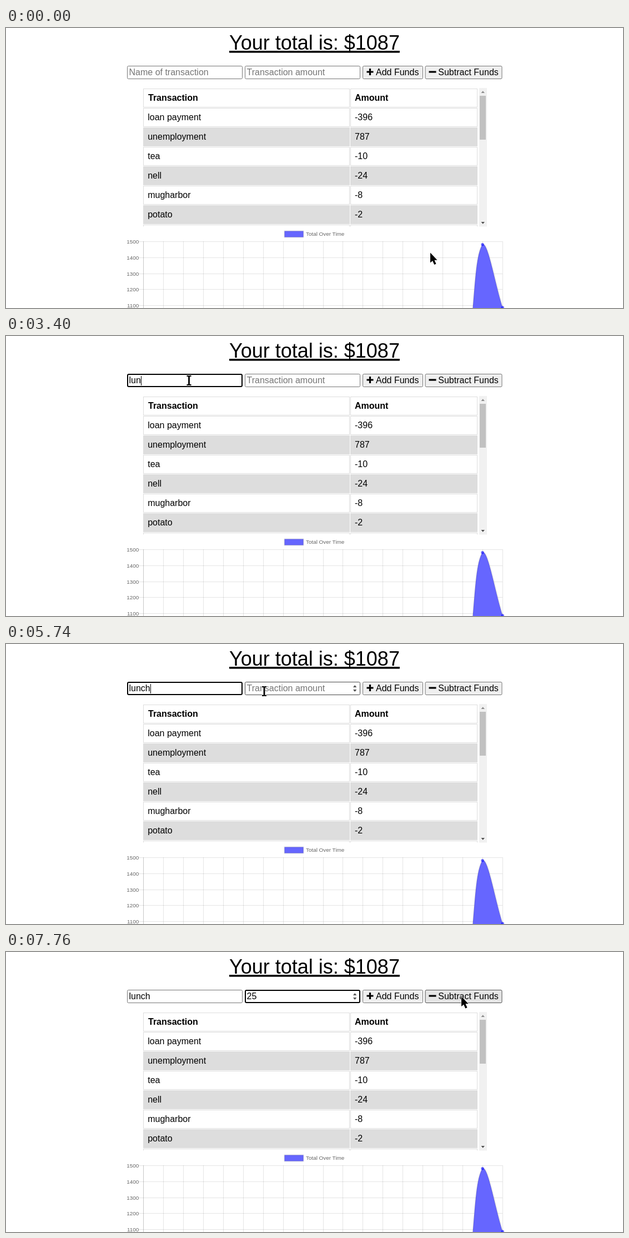
An HTML page that plays this animation: 1111 by 504 pixels, repeating every 8000 ms.

```html
<!DOCTYPE html>
<html lang="en">
<head>
<meta charset="utf-8">
<title>Budget tracker</title>
<style>
  html, body { margin: 0; width: 100%; height: 100%; overflow: hidden; background: #fff; }
  svg { display: block; width: 1111px; height: 504px; font: 16px "Liberation Sans", Arial, sans-serif; }
  text { white-space: pre; }
  .title { font-size: 36px; text-decoration: underline; }
  .head { font-weight: bold; }
  .small { font-size: 9.9px; fill: #666; }
  .cell { fill: #fff; stroke: #ddd; }
  .cell.odd { fill: #ddd; }
  .field { fill: #fff; stroke: #767676; }
  .field.hover { stroke: #484848; }
  .field.focus { stroke: #000; stroke-width: 2; }
  .hint { fill: #757575; }
  .button { fill: #efefef; stroke: #767676; }
  .button.hover { fill: #e5e5e5; stroke: #4f4f4f; }
  .grid { stroke: #000; stroke-opacity: .1; }
  .area { fill: #66f; }
  .dot { fill: rgba(0, 0, 255, .6); }
  .line { fill: none; stroke: rgba(0, 0, 0, .1); stroke-width: 2; }
  .arrows { fill: #505050; }
</style>
</head>
<body>
<svg viewBox="0 0 1111 504">
  <defs>
    <clipPath id="tableClip"><rect x="240" y="100" width="612" height="257.5"/></clipPath>
  </defs>

  <text class="title" x="402" y="39">Your total is: $1087</text>

  <rect class="field" id="nameBox" rx="2"/>
  <text id="nameText" x="221.5" y="85"></text>
  <rect class="field" id="amountBox" rx="2"/>
  <text id="amountText" x="433.5" y="85"></text>
  <path class="arrows" id="spinner" d="M625 78l3.2-4 3.2 4zM625 82h6.4l-3.2 4z"/>
  <rect id="caret" y="72" width="1" height="17"/>

  <rect class="button" id="addBox" x="642.5" y="68.5" width="108" height="23" rx="2"/>
  <path d="M649.5 79h12M655.5 73v12" stroke="#000" stroke-width="3.2"/>
  <text x="666" y="85">Add Funds</text>
  <rect class="button" id="subtractBox" x="755" y="68.5" width="138" height="23" rx="2"/>
  <path d="M761.5 79h13" stroke="#000" stroke-width="3.2"/>
  <text x="778.3" y="85">Subtract Funds</text>

  <g id="table" clip-path="url(#tableClip)"></g>
  <rect x="852" y="108" width="14" height="249.5" fill="#f1f1f1"/>
  <rect x="853" y="122" width="11" height="79" fill="#c1c1c1"/>
  <path d="M855.5 117l3.2-3.8 3.2 3.8z" fill="#8b8b8b"/>
  <path class="arrows" d="M855.5 349h6.4l-3.2 3.8z"/>

  <rect class="area" x="501.5" y="365.5" width="34" height="11"/>
  <rect class="line" x="501.5" y="365.5" width="34" height="11"/>
  <text class="small" x="540" y="374">Total Over Time</text>
  <g id="grid"></g>
  <path class="area" d="M822 615C847 538 839 419 858 389.5C868 384.5 880 457.6 894.3 503V615z"/>
  <path class="line" d="M822 615C847 538 839 419 858 389.5C868 384.5 880 457.6 894.3 503"/>
  <circle class="dot" cx="858" cy="389.7" r="2.6"/>
  <circle class="dot" cx="894.3" cy="503" r="2.6"/>

  <g id="pointer">
    <path id="arrow" stroke="#fff" stroke-width="1.2" paint-order="stroke"
      d="M0 0V18L4.1 14.4L7.2 21.6L10.5 20.1L7.4 13.2H12.5z"/>
    <path id="beam" stroke="#fff" stroke-width="1.2" paint-order="stroke"
      d="M-4-9H-1L0-8.4L1-9H4V-7H1.4V7H4V9H1L0 8.4L-1 9H-4V7H-1.4V-7H-4z"/>
  </g>
</svg>
<script>
  const LOOP = 8000, BLINK = 540;
  const $ = id => document.getElementById(id);

  function add(parent, tag, attrs, text = '') {
    const node = document.createElementNS('http://www.w3.org/2000/svg', tag);
    for (const key in attrs) node.setAttribute(key, attrs[key]);
    node.textContent = text;
    $(parent).append(node);
  }

  const rows = [
    ['Transaction', 'Amount'], ['loan payment', '-396'], ['unemployment', '787'], ['tea', '-10'],
    ['nell', '-24'], ['mugharbor', '-8'], ['potato', '-2'], ['', '']
  ];
  rows.forEach(([label, amount], i) => {
    const y = 109.5 + 35 * i;
    const cell = (x, width, text, textX) => {
      add('table', 'rect', { class: i && i % 2 === 0 ? 'cell odd' : 'cell', x, y, width, height: 33 });
      add('table', 'text', { class: i ? '' : 'head', x: textX, y: y + 21.5 }, text);
    };
    cell(247.5, 371, label, i ? 255.2 : 256);
    cell(620.5, 228, amount, 628);
  });

  for (let i = 0; i < 5; i++) {
    const y = Math.floor(384.5 + 28.75 * i) + .5;
    add('grid', 'path', { class: 'grid', d: `M239 ${y}H894` });
    add('grid', 'text', { class: 'small', x: 239.3, y: y + 3.3, 'text-anchor': 'end' }, 1500 - 100 * i);
  }
  for (let i = 0; i < 19; i++) {
    const x = Math.floor(247.9 + 35.9 * i) + .5;
    add('grid', 'path', { class: 'grid', d: `M${x} 384V504`, style: i ? '' : 'stroke-opacity:.22' });
  }

  const smooth = u => u * u * (3 - 2 * u);
  const easeOut = u => 1 - (1 - u) ** 2;

  // Each move advances in seven jumps; bend lifts the path off a straight line.
  const moves = [
    { start: 70, end: 470, from: [764, 404.5], to: [329.5, 79], ease: smooth, bend: 0 },
    { start: 1160, end: 1160, from: [329.5, 79], to: [329.5, 80], ease: smooth, bend: 0 },
    { start: 5270, end: 5740, from: [329.5, 80], to: [465, 85], ease: easeOut, bend: 10.3 },
    { start: 7290, end: 7760, from: [465, 85], to: [820, 80], ease: smooth, bend: 0 }
  ];

  // [time, focused field, name, amount]; every entry restarts the caret blink.
  const edits = [
    [0, '', '', ''], [850, 'name', '', ''], [2710, 'name', 'l', ''], [3020, 'name', 'lu', ''],
    [3400, 'name', 'lun', ''], [4100, 'name', 'lunc', ''], [4410, 'name', 'lunch', ''],
    [5890, 'amount', 'lunch', ''], [6980, 'amount', 'lunch', '2'], [7060, 'amount', 'lunch', '25']
  ];

  const fields = {
    name: { x: 218, hint: 'Name of transaction', textX: 221.5 },
    amount: { x: 430, hint: 'Transaction amount', textX: 433.5 }
  };

  function pointerAt(t) {
    const move = moves.findLast(m => t >= m.start);
    if (!move) return moves[0].from;
    const { start, end, from, to, ease, bend } = move;
    // The 10 ms lead absorbs the rounding of the jump times.
    const jump = end > start ? Math.floor((t - start + 10) / (end - start) * 6) + 1 : 7;
    const s = ease(Math.min(jump, 7) / 7);
    return [from[0] + (to[0] - from[0]) * s, from[1] + (to[1] - from[1]) * s + bend * 4 * s * (1 - s)];
  }

  function drawField(id, value, hover, focus) {
    const { x, hint } = fields[id], inset = focus ? 1 : .5;
    const box = $(id + 'Box'), text = $(id + 'Text');
    const shape = { x: x + inset, y: 68 + inset, width: 208 - 2 * inset, height: 24 - 2 * inset };
    for (const key in shape) box.setAttribute(key, shape[key]);
    box.setAttribute('class', `field ${focus ? 'focus' : hover ? 'hover' : ''}`);
    text.textContent = value || hint;
    text.setAttribute('class', value ? '' : 'hint');
  }

  function show(id, visible) {
    $(id).setAttribute('visibility', visible ? 'visible' : 'hidden');
  }

  function draw(t) {
    const [x, y] = pointerAt(t);
    const over = (left, right) => x >= left && x <= right && y >= 68 && y <= 92;
    const overName = over(218, 426), overAmount = over(430, 638);
    const [since, focus, name, amount] = edits.findLast(e => t >= e[0]);

    drawField('name', name, overName, focus === 'name');
    drawField('amount', amount, overAmount, focus === 'amount');
    show('spinner', overAmount || focus === 'amount');
    $('addBox').classList.toggle('hover', over(642, 751));
    $('subtractBox').classList.toggle('hover', over(754, 894));

    show('caret', focus && Math.floor((t - since) / BLINK) % 2 === 0);
    if (focus) {
      const typed = focus === 'name' ? name : amount;
      const width = typed ? $(focus + 'Text').getComputedTextLength() : 0;
      $('caret').setAttribute('x', Math.round(fields[focus].textX + width));
    }

    $('pointer').setAttribute('transform', `translate(${x} ${y})`);
    show('beam', overName || overAmount);
    show('arrow', !overName && !overAmount);
  }

  const began = performance.now();
  function tick() {
    draw((performance.now() - began) % LOOP);
    requestAnimationFrame(tick);
  }
  tick();
</script>
</body>
</html>
```
